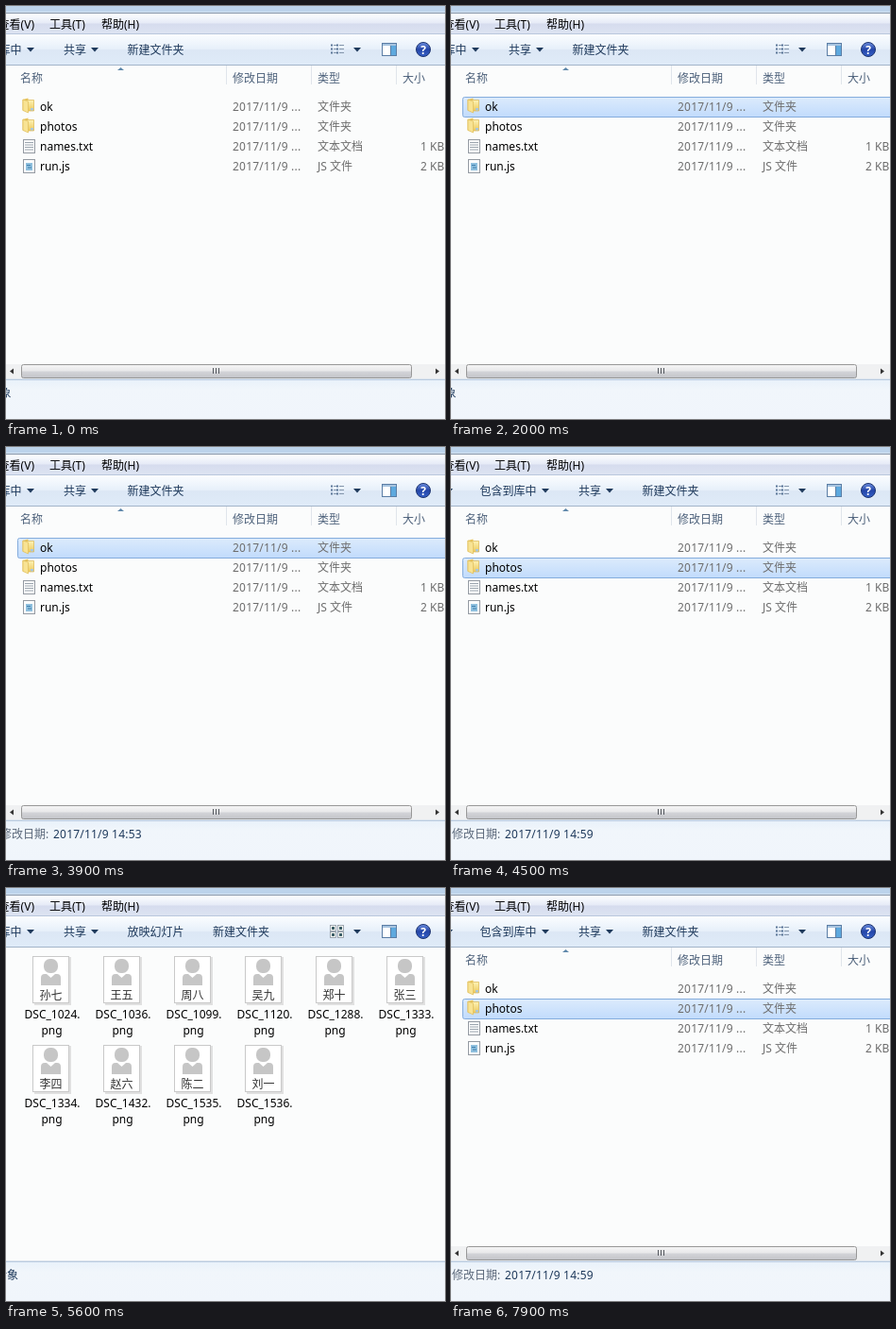
These frames come from a looping animation (465 px wide and 437 px high, 8 s). An HTML page:

```html
<!DOCTYPE html>
<html lang="zh-CN">
<head>
<meta charset="utf-8">
<title>文件夹</title>
<style>
html, body { margin: 0; width: 100%; height: 100%; overflow: hidden; background: #fbfcfc; }
svg { display: block; width: 465px; height: 437px; }
text { font: 12px "Noto Sans", "Noto Sans CJK SC", "Noto Sans CJK", sans-serif; white-space: pre; }
.num { letter-spacing: .2px; }
</style>
</head>
<body>
<svg viewBox="0 0 465 437" xmlns="http://www.w3.org/2000/svg">
  <defs id="defs"></defs>
  <g id="view"></g>
</svg>
<script>
const LOOP = 8000;
const NAVY = '#1e395b', GRAY = '#6d6d6d';

const gradient = (id, ...stops) =>
  `<linearGradient id="${id}" x2="0" y2="1">${stops.map(([at, color]) =>
    `<stop offset="${at}" stop-color="${color}"/>`).join('')}</linearGradient>`;

const rect = (x, y, w, h, fill, extra = '') =>
  `<rect x="${x}" y="${y}" width="${w}" height="${h}" fill="${fill}" ${extra}/>`;

const path = (d, fill, extra = '') => `<path d="${d}" fill="${fill}" ${extra}/>`;

const text = (x, y, str, fill = '#000', extra = '') =>
  `<text x="${x}" y="${y}" fill="${fill}" ${extra}>${str}</text>`;

const caret = (x, y = 46) => path(`M${x - 4} ${y - 2}h8l-4 4.5z`, NAVY);

document.getElementById('defs').innerHTML =
  gradient('menu', [0, '#fdfeff'], [.45, '#e6ebf7'], [.5, '#d6dcee'], [1, '#dde4f2']) +
  gradient('bar', [0, '#fbfdff'], [.48, '#e7f0fa'], [.52, '#dce7f5'], [1, '#dfebf8']) +
  gradient('hover', [0, '#fafcfe'], [1, '#ebf3fd']) +
  gradient('select', [0, '#dcebfc'], [1, '#c1dbfc']) +
  gradient('thumb', [0, '#f5f5f5'], [.48, '#e8e8ea'], [.52, '#d3d4d8'], [1, '#c3c4c9']) +
  gradient('pane', [0, '#e9f1fa'], [.25, '#f1f6fb'], [1, '#f0f5fb']) +
  gradient('folder', [0, '#fdf2b4'], [1, '#ecc95c']) +
  gradient('help', [0, '#6d8fe0'], [.5, '#2546a8'], [1, '#3560c8']);

const ROWS = [
  { name: 'ok', type: '文件夹', icon: folder },
  { name: 'photos', type: '文件夹', icon: folder },
  { name: 'names.txt', type: '文本文档', size: '1 KB', icon: textPage },
  { name: 'run.js', type: 'JS 文件', size: '2 KB', icon: scriptPage },
];

const PHOTOS = [
  [1024, '孙七'], [1036, '王五'], [1099, '周八'], [1120, '吴九'], [1288, '郑十'],
  [1333, '张三'], [1334, '李四'], [1432, '赵六'], [1535, '陈二'], [1536, '刘一'],
];

function folder(y) {
  return path(`M17.5 ${y + 3}l6-1.5v14l-6-1z`, '#e9c45a') +
    path(`M20 ${y + 3.5}h9.5v11.5h-9.5z`, 'url(#folder)', 'stroke="#dcb650" stroke-width=".7"') +
    path(`M18 ${y + 3}l5.5 2v12l-5.5-2.5z`, '#f8e394', 'stroke="#e0bd59" stroke-width=".7"') +
    rect(26, y + 12, 3, 2.5, '#a9c7dc');
}

function page(y) {
  return rect(18.5, y + 3.5, 12, 14, '#fcfdfd', 'stroke="#949aa2"');
}

function textPage(y) {
  return page(y) + path(`M20 ${y + 6.5}h9m-9 2.5h9m-9 2.5h9m-9 2.5h9`, 'none', 'stroke="#9ba4ae"');
}

function scriptPage(y) {
  return page(y) + rect(21, y + 7, 7, 8, '#8fc0de') +
    path(`M22 ${y + 9.5}h4m-3 2.5h4`, 'none', 'stroke="#3f7fae"');
}

function viewIcon(kind) {
  if (kind === 'list') {
    return [41.5, 45.5, 49.5].map(y =>
      path(`M344 ${y}h2m4 0h2m3 0h0`, 'none', 'stroke="#5b7698" stroke-width="2"') +
      path(`M347 ${y}h3m3 0h5`, 'none', 'stroke="#8395ab"')).join('');
  }
  if (kind === 'empty') {
    return rect(344.5, 41.5, 13, 10, '#fff', 'stroke="#8595a8"') +
      rect(346, 43, 10, 7, '#8fc4ea') + path('M346 50v-3l3-2 3 2 4 1v2z', '#3a7590');
  }
  return [[343, 39], [351, 39], [343, 46], [351, 46]].map(([x, y]) =>
    rect(x + .5, y + .5, 6, 6, '#f6f8f4', 'stroke="#8a94a0" stroke-width=".8"') +
    rect(x + 2, y + 2, 3, 3, '#3d5f68')).join('');
}

function toolbar({ kind, wide, button }) {
  const dx = wide ? 74 : 0;
  let out = rect(0, 0, 465, 7, '#bcd3eb') + rect(0, 6, 465, 1, '#d5e3f2') +
    rect(0, 7, 465, 1, '#8796aa') +
    rect(0, 8, 465, 22, 'url(#menu)') + rect(0, 29, 465, 1, '#b9c7dc') +
    rect(0, 30, 465, 32, 'url(#bar)') + rect(0, 62, 465, 1, '#a3b4c9') +
    text(30, 24, '查看(V)', '#000', 'text-anchor="end"') +
    text(46, 24, '工具(T)') + text(101, 24, '帮助(H)');
  if (button) {
    out += rect(-60, 34.5, 105.5, 24, 'url(#hover)', 'rx="2" stroke="#a9bfd9"');
  }
  if (wide) out += caret(-2);
  out += text(dx - 43.5, 51, '包含到库中', NAVY) + caret(dx + 26) +
    text(dx + 61, 51, '共享', NAVY) + caret(dx + 94);
  const labels = kind === 'photos' ? ['放映幻灯片', '新建文件夹'] : ['新建文件夹'];
  labels.forEach((label, i) => { out += text(dx + 128.5 + 90.5 * i, 51, label, NAVY); });
  return out + viewIcon(kind) + caret(372) +
    rect(398.5, 39.5, 15, 13, '#fff', 'stroke="#5a7da5"') + rect(399, 40, 14, 2, '#a6c3df') +
    rect(408, 42, 5, 10, '#5ea9de') + path('M407.5 42v10', 'none', 'stroke="#5a7da5"') +
    '<circle cx="442" cy="46" r="7.5" fill="url(#help)" stroke="#1d3470"/>' +
    text(442, 50.5, '?', '#fff', 'text-anchor="middle" style="font-weight:700"');
}

function highlight(y, fill, stroke, opacity = 1) {
  return rect(12.5, y + .5, 470, 21, `url(#${fill})`, `rx="2" stroke="${stroke}" opacity="${opacity}"`);
}

function scrollbar() {
  return rect(0, 379, 465, 15, '#f0f1f2') +
    rect(16.5, 379.5, 413, 14, 'url(#thumb)', 'rx="2" stroke="#979797"') +
    path('M219.5 383v6m3 -6v6m3 -6v6', 'none', 'stroke="#55595f"') +
    path('M8 383.5v6l-4-3z', '#333') + path('M455 383.5v6l4-3z', '#333');
}

function listing({ selected, hover, fade }) {
  let out = [233, 323, 413].map(x => rect(x, 63, 1, 20, '#e0e5eb')).join('') +
    path('M118 68l3.5-3 3.5 3z', '#5f88ab');
  [[15, '名称'], [240, '修改日期'], [330, '类型'], [420, '大小']].forEach(([x, label]) => {
    out += text(x, 80.5, label, '#4c607a');
  });
  ROWS.forEach((row, i) => {
    const y = 96 + 21 * i, base = y + 15;
    if (i === selected) out += highlight(y, 'select', '#84acdd');
    else if (i === hover) out += highlight(y, 'hover', '#b8d6fb', fade);
    out += row.icon(y) + text(36, base, row.name) +
      text(240, base, '2017/11/9 ...', GRAY, 'class="num"') + text(330, base, row.type, GRAY);
    if (row.size) out += text(439, base, row.size, GRAY);
  });
  return out + scrollbar();
}

// The closed list leaves a pale trace behind the empty folder.
function emptyFolder() {
  let out = rect(12, 117, 453, 21, '#f9fbfd') + rect(12, 138, 453, 22, '#f8f8f8');
  ROWS.slice(1).forEach((row, i) => {
    const y = 132 + 21 * i;
    out += text(36, y, row.name, '#fff') + text(240, y, '2017/11/9 ...', '#fff', 'class="num"') +
      text(330, y, row.type, '#fff') + text(439, y, row.size || '', '#fff');
  });
  return out + rect(18, 141, 13, 15, '#fff') + text(188.5, 91, '该文件夹为空。', GRAY);
}

function photoGrid({ hover }) {
  return PHOTOS.map(([id, name], i) => {
    const x = 75 * (i % 6), y = 94 * Math.floor(i / 6);
    const mid = 'text-anchor="middle"';
    const frame = i === hover
      ? rect(12.5, 69.5, 74, 92, 'url(#hover)', 'rx="2" stroke="#b8d6fb"') : '';
    return `<g transform="translate(${x} ${y})">${frame}` +
      rect(30, 73, 39, 51, '#e0e0e0') +
      rect(28.5, 72.5, 38, 49, '#fff', 'stroke="#c9c9c9"') +
      rect(40, 75, 15, 15, '#c6c6c6', 'rx="6.5"') +
      path('M37 103v-8q0-4 4-4h2l4.5 4 4.5-4h2q4 0 4 4v8z', '#c6c6c6') +
      text(47.5, 117.5, name, '#333', mid) +
      text(49, 138, `DSC_${id}.`, '#000', mid) + text(48.5, 155, 'png', '#000', mid) + '</g>';
  }).join('');
}

function details({ kind, date, wide }) {
  const dx = wide ? 7 : 0;
  const bar = rect(0, 394, 465, 1, '#dfe6ee') + rect(0, 395, 465, 1, '#b9cbe0') +
    rect(0, 396, 465, 41, 'url(#pane)');
  if (!date) {
    return bar + text(kind === 'photos' ? 13 : 5.5, 414, '个对象', NAVY, 'text-anchor="end"');
  }
  return bar + text(dx - 6, 414, '修改日期:', '#5a6779') +
    text(dx + 50, 414, `2017/11/9 ${date}`, NAVY, 'class="num"');
}

const BODY = { list: listing, empty: emptyFolder, photos: photoGrid };

const list = (opts = {}) => ({ kind: 'list', ...opts });
const photos = (opts = {}) => ({ kind: 'photos', ...opts });
const OK = { selected: 0, date: '14:53' };
const PICS = { selected: 1, date: '14:59' };

const STEPS = [
  [0, list()],
  [1400, list({ hover: 2 })],
  [1500, list({ hover: 1 })],
  [1600, list({ hover: 0 })],
  [2000, list({ selected: 0 })],
  [2100, list({ ...OK, wide: true })],
  [2200, { kind: 'empty' }],
  [3900, list(OK)],
  [4000, list({ ...OK, wide: true })],
  [4100, list({ ...OK, wide: true, hover: 1, fade: .5 })],
  [4200, list({ ...OK, wide: true, hover: 1 })],
  [4400, list({ ...OK, wide: true, selected: 1 })],
  [4500, list({ ...PICS, wide: true })],
  [4600, photos({ hover: 0 })],
  [5400, photos({ hover: 1 })],
  [5500, photos({ hover: 7 })],
  [5600, photos()],
  [7300, photos({ button: true })],
  [7400, photos()],
  [7800, list(PICS)],
  [7900, list({ ...PICS, wide: true })],
];

const view = document.getElementById('view');
const start = performance.now();
let shown = null;

function draw(now) {
  const t = Math.max(0, now - start) % LOOP;
  const state = STEPS.filter(([at]) => at <= t).pop()[1];
  if (state !== shown) {
    shown = state;
    view.innerHTML = rect(0, 0, 465, 437, '#fbfcfc') +
      BODY[state.kind](state) + toolbar(state) + details(state);
  }
  requestAnimationFrame(draw);
}
draw(start);
</script>
</body>
</html>
```
